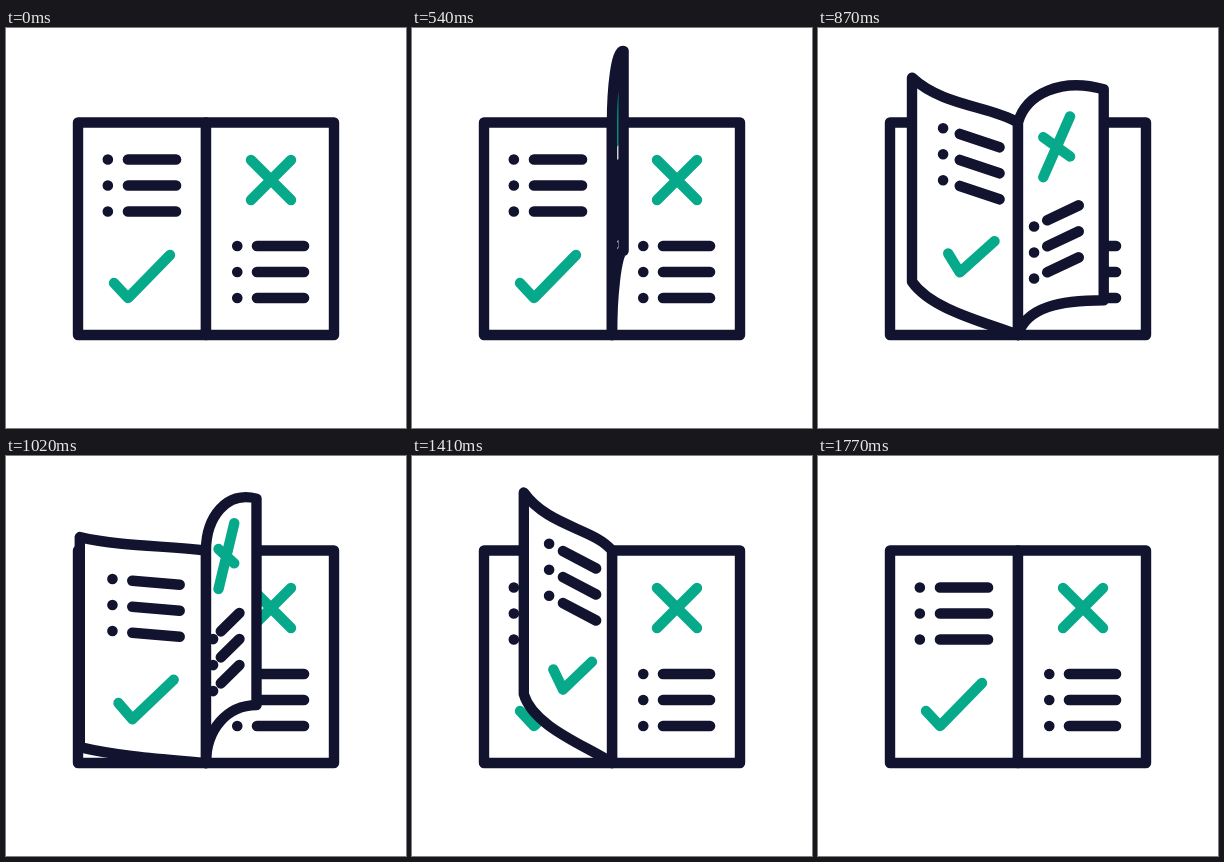
An HTML page with a canvas for the animation above (1800 ms loop, 400 by 400 pixels).

```html
<!DOCTYPE html>
<html lang="en">
<head>
<meta charset="utf-8">
<title>Turning pages</title>
<style>
  html, body { margin: 0; width: 100%; height: 100%; overflow: hidden; background: #fff; }
  canvas { display: block; width: 400px; height: 400px; }
</style>
</head>
<body>
<canvas id="stage" width="400" height="400"></canvas>
<script>
const ctx = document.getElementById('stage').getContext('2d');
const INK = '#11132f', GREEN = '#06aa8b';
const LOOP = 1800, STEP = 30, RISE = 570, FALL = 600, STARTS = [0, 600];
const SPINE = 200, TOP = 94.5, WIDTH = 128, HEIGHT = 212.5, THIRD = 43;
const ROWS = [0, 26, 52];
const CROSS = [[[-0.5, -20], [0.5, 20]], [[-0.5, 20], [0.5, -20]]];
const CHECK = [[[-0.5, 14], [-0.25, 29], [0.5, -14]]];

function stroke(color, width, path) {
  ctx.strokeStyle = color;
  ctx.lineWidth = width;
  ctx.stroke(path);
}

// Points are (across, down); across follows the slant of the page
function addLine(path, { x, y, dx, dy }, points) {
  points.forEach(([u, v], i) =>
    path[i ? 'lineTo' : 'moveTo'](x + u * dx, y + u * dy + v));
}

function drawContent({ list, mark, shape }) {
  const rows = new Path2D(), sign = new Path2D();
  for (const v of ROWS) {
    addLine(rows, list, [[-0.92, v], [-0.92, v + 0.01]]);
    addLine(rows, list, [[-0.5, v], [0.5, v]]);
  }
  for (const line of shape) addLine(sign, mark, line);
  stroke(INK, 10.6, rows);
  stroke(GREEN, 10.4, sign);
}

// open: visible share of the width, 1 flat to 0 edge-on; tilt: its sine
function frontContent(open, tilt, lift) {
  const bend = 22 * open * (1 - open);
  return {
    list: { x: SPINE + 74.5 * open - bend, y: 218 - lift, dx: 47 * open, dy: -20 * tilt },
    mark: { x: SPINE + 65 * open - bend, y: 152 - lift, dx: 40 * open, dy: -28 * tilt },
    shape: CROSS
  };
}

function backContent(open, tilt) {
  const bend = 20 * open ** 3 * tilt;
  return {
    list: {
      x: SPINE - 54 * open + bend, y: 131.5 - (61 - 33 * open) * tilt,
      dx: 48 * open, dy: 24 * tilt
    },
    mark: {
      x: SPINE - 64 * open + bend, y: 241 - (66 - 33 * open) * tilt,
      dx: 56 * open, dy: 28 * tilt
    },
    shape: CHECK
  };
}

// Upper and lower edges as [near handle, far handle, free corner],
// measured from the ends of the spine
function frontPage(u) {
  const open = 1 - 0.61 * u - 0.39 * u ** 3;
  const tilt = Math.sqrt(1 - open * open);
  const lift = 70 * u + 10 * u ** 12;
  const curl = Math.min(1, 1.8 * u);
  const x = WIDTH * open, low = -lift - 15 * u ** 3;
  const near = [x * 0.34 * (1 - curl * curl), -33 * curl];
  const farX = x - x * 0.34 * (1 + u);
  const crest = 32 * curl * curl * (1 - u);
  return {
    upper: [near, [farX, -lift - crest], [x, -lift]],
    lower: [near, [farX, low], [x, low]],
    content: frontContent(open, tilt, lift)
  };
}

function backPage(v) {
  const open = 1 - (1 - v) ** 4 * (1 + 3.5 * v);
  const tilt = Math.sqrt(1 - open * open);
  const x = -WIDTH * open, lift = 80 * tilt, low = -95 * tilt;
  const flat = THIRD * open * open, bulge = 10 * (1 - open);
  const sag = (20 + 38 * open) * tilt;
  return {
    upper: [[bulge - flat, -30 * tilt], [x + flat + bulge, sag - lift], [x, -lift]],
    lower: [[-flat - bulge * 0.6, -22 * tilt], [x + THIRD * open ** 4, low + sag], [x, low]],
    content: backContent(open, tilt)
  };
}

function drawPage({ upper, lower, content }) {
  const at = (points, y) => points.map(p => [SPINE + p[0], y + p[1]]);
  const [a, b, c] = at(upper, TOP);
  const [d, e, f] = at(lower, TOP + HEIGHT);
  const edge = new Path2D();
  edge.moveTo(SPINE, TOP);
  edge.bezierCurveTo(...a, ...b, ...c);
  edge.lineTo(...f);
  edge.bezierCurveTo(...e, ...d, SPINE, TOP + HEIGHT);
  edge.closePath();
  ctx.fillStyle = '#fff';
  ctx.fill(edge);
  drawContent(content);
  stroke(INK, 10.4, edge);
}

function draw(time) {
  ctx.fillStyle = '#fff';
  ctx.fillRect(0, 0, 400, 400);
  ctx.lineCap = ctx.lineJoin = 'round';
  drawPage(backPage(1));
  drawPage(frontPage(0));
  for (const start of STARTS) {
    const t = time - start;
    if (t <= 0 || t >= RISE + FALL) continue;
    drawPage(t < RISE ? frontPage(t / RISE) : backPage((t - RISE) / FALL));
  }
}

const begin = performance.now();
function tick() {
  const time = (performance.now() - begin) % LOOP;
  draw(Math.floor(time / STEP) * STEP);
  requestAnimationFrame(tick);
}
tick();
</script>
</body>
</html>
```
